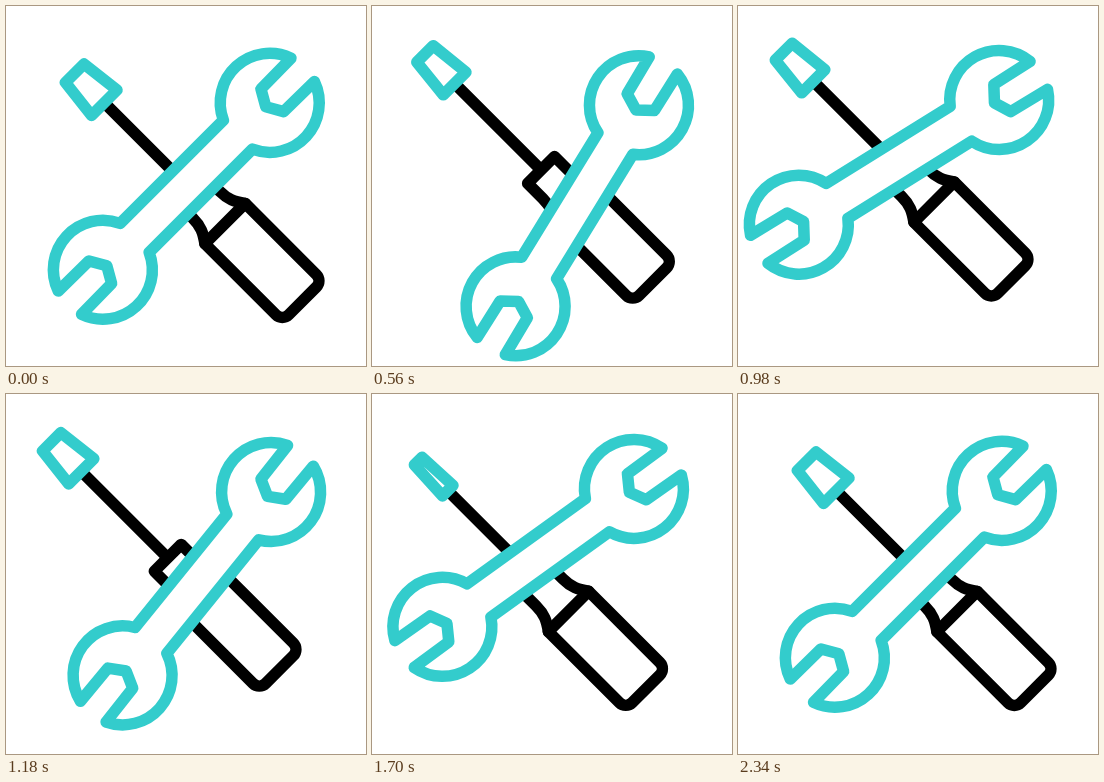
Recreate the animation shown at these times as an HTML page. Size 360x360 px, loop 2400 ms.

```html
<!DOCTYPE html>
<html lang="en">
<head>
<meta charset="utf-8">
<title>Tools</title>
<style>
  html, body { margin: 0; width: 100%; height: 100%; overflow: hidden; background: #fff; }
  svg { display: block; width: 100%; height: 100%; }
  path { fill: #fff; stroke: #000; stroke-width: 11.5; stroke-linejoin: round; stroke-linecap: round; }
  .teal { stroke: #33cccc; }
  #blade { vector-effect: non-scaling-stroke; }
</style>
</head>
<body>
<svg viewBox="0 0 360 360">
  <g id="driver">
    <path d="M26 0H148"/>
    <path d="M197-28.5C188-22 182-19 170-19H148.5V19H170C182 19 188 22 197 28.5"/>
    <path d="M197-28.5H297.5a9 9 0 0 1 9 9V19.5a9 9 0 0 1-9 9H197Z"/>
    <path id="blade" class="teal" d="M-15.6-13.1L26.2-18V18L-15.6 13.1Z"/>
  </g>
  <g id="wrench">
    <path class="teal" transform="translate(180.3 180.3) rotate(-45)"
      d="M164.6-16.5L121.6-16L112.4 0L121.6 16L164.6 16.5A49.4 49.4 0 0 1 73 20.5
      H-73A49.4 49.4 0 0 1-164.6 16.5L-121.6 16L-112.4 0L-121.6-16L-164.6-16.5
      A49.4 49.4 0 0 1-73-20.5H73A49.4 49.4 0 0 1 164.6-16.5Z"/>
  </g>
</svg>
<script>
const LOOP = 2400;
const [driver, blade, wrench] = ['driver', 'blade', 'wrench'].map(id => document.getElementById(id));

// Progress from 0 to 1 over a stretch of time, plain and eased
const span = (t, from, length) => Math.min(1, Math.max(0, (t - from) / length));
const ease = (t, from, length) => {
  const s = span(t, from, length);
  return s * s * (3 - 2 * s);
};

// Five equal swings between these angles
const angles = [0, -15, 15, -15, 10, 0];
const swing = t => angles.slice(1).reduce(
  (sum, a, i) => sum + (a - angles[i]) * ease(t, 92 + 413 * i, 413), 0);

// The driver moves up and left, then comes down, then returns right
const left = t => ease(t, 0, 900) - ease(t, 1650, 600);
const up = t => ease(t, 0, 700) - ease(t, 1050, 680);

// Ten half turns, slower at both ends
const turn = t => {
  const s = span(t, 40, 2300);
  return Math.PI * (10 * s - 0.42 * Math.sin(2 * Math.PI * s));
};

function draw(t) {
  const x = 79.75 - 23 * left(t), y = 78.25 - 21.5 * up(t);
  const width = Math.max(0.02, Math.abs(Math.cos(turn(t))));
  driver.setAttribute('transform', `translate(${x} ${y}) rotate(45)`);
  blade.setAttribute('transform', `scale(1 ${width})`);
  wrench.setAttribute('transform', `rotate(${swing(t)} 275 84.5)`);
}

const start = performance.now();
function tick() {
  draw((performance.now() - start) % LOOP);
  requestAnimationFrame(tick);
}
tick();
</script>
</body>
</html>
```
